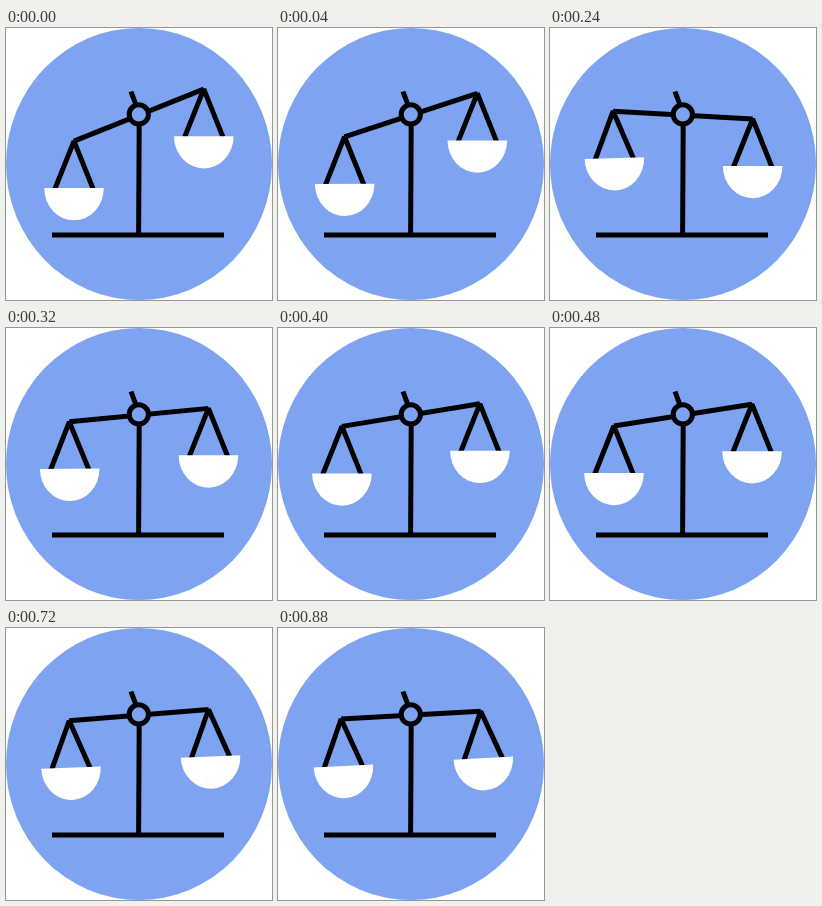
Recreate the animation shown at these times as an HTML page. Size 266 px wide and 272 px high, loop 1800 ms.

```html
<!DOCTYPE html>
<html lang="en">
<head>
<meta charset="utf-8">
<title>Balance scale</title>
<style>
  html, body { margin: 0; width: 100%; height: 100%; overflow: hidden; background: #fff; }
  svg { display: block; width: 100%; height: 100%; }
  .line { fill: none; stroke: #000; stroke-width: 5; stroke-linejoin: bevel; }
</style>
</head>
<body>
<svg viewBox="0 0 266 272">
  <defs>
    <g id="pan">
      <path class="line" d="M-19.2 48 L0 0 L19.2 48"/>
      <path d="M-29.8 47 H29.8 A29.8 32.3 0 0 1 -29.8 47 Z" fill="#fff"/>
    </g>
  </defs>
  <ellipse cx="133" cy="136" rx="133" ry="136" fill="#7ea3f1"/>
  <path class="line" d="M46 207 H218 M133.2 96 L132.6 207 M125 63.5 L130 77"/>
  <path id="beam" class="line" d="M-69.9 0 H69.9"/>
  <use id="left" href="#pan"/>
  <use id="right" href="#pan"/>
  <circle class="line" cx="132.8" cy="86.4" r="9.6" style="fill:#7ea3f1"/>
</svg>
<script>
const LOOP = 1800, STEP = 40, ARM = 69.9, PIVOT = [132.9, 87.1];
const [beam, left, right] = ['beam', 'left', 'right'].map(id => document.getElementById(id));

// [time in ms, angle in degrees]
const beamKeys = [[0, -21.8], [160, 7], [400, -9.3], [880, -3.2]];
const leftKeys = [[0, 0], [160, -2], [400, 0], [880, -2.8]];
const rightKeys = [[400, 0], [880, -3.1]];

// cubic-bezier(.42, 0, .58, 1), solved by bisection
function ease(x) {
  let lo = 0, hi = 1, u = x;
  for (let i = 0; i < 24; i++) {
    u = (lo + hi) / 2;
    const bx = 3 * (1 - u) * u * (0.42 * (1 - u) + 0.58 * u) + u ** 3;
    if (bx < x) lo = u; else hi = u;
  }
  return u * u * (3 - 2 * u);
}

function valueAt(keys, t) {
  const next = keys.findIndex(k => k[0] > t);
  if (next < 0) return keys[keys.length - 1][1];
  if (next === 0) return keys[0][1];
  const [t0, a] = keys[next - 1], [t1, b] = keys[next];
  return a + (b - a) * ease((t - t0) / (t1 - t0));
}

function place(el, x, y, angle) {
  el.setAttribute('transform', `translate(${x} ${y}) rotate(${angle})`);
}

function draw(now) {
  const t = Math.floor((now % LOOP) / STEP) * STEP;
  const tilt = valueAt(beamKeys, t), rad = tilt * Math.PI / 180;
  const dx = ARM * Math.cos(rad), dy = ARM * Math.sin(rad);
  const [x, y] = PIVOT;
  place(beam, x, y, tilt);
  place(left, x - dx, y - dy, valueAt(leftKeys, t));
  place(right, x + dx, y + dy, valueAt(rightKeys, t));
}

const start = performance.now();
function tick() {
  draw(performance.now() - start);
  requestAnimationFrame(tick);
}
tick();
</script>
</body>
</html>
```
